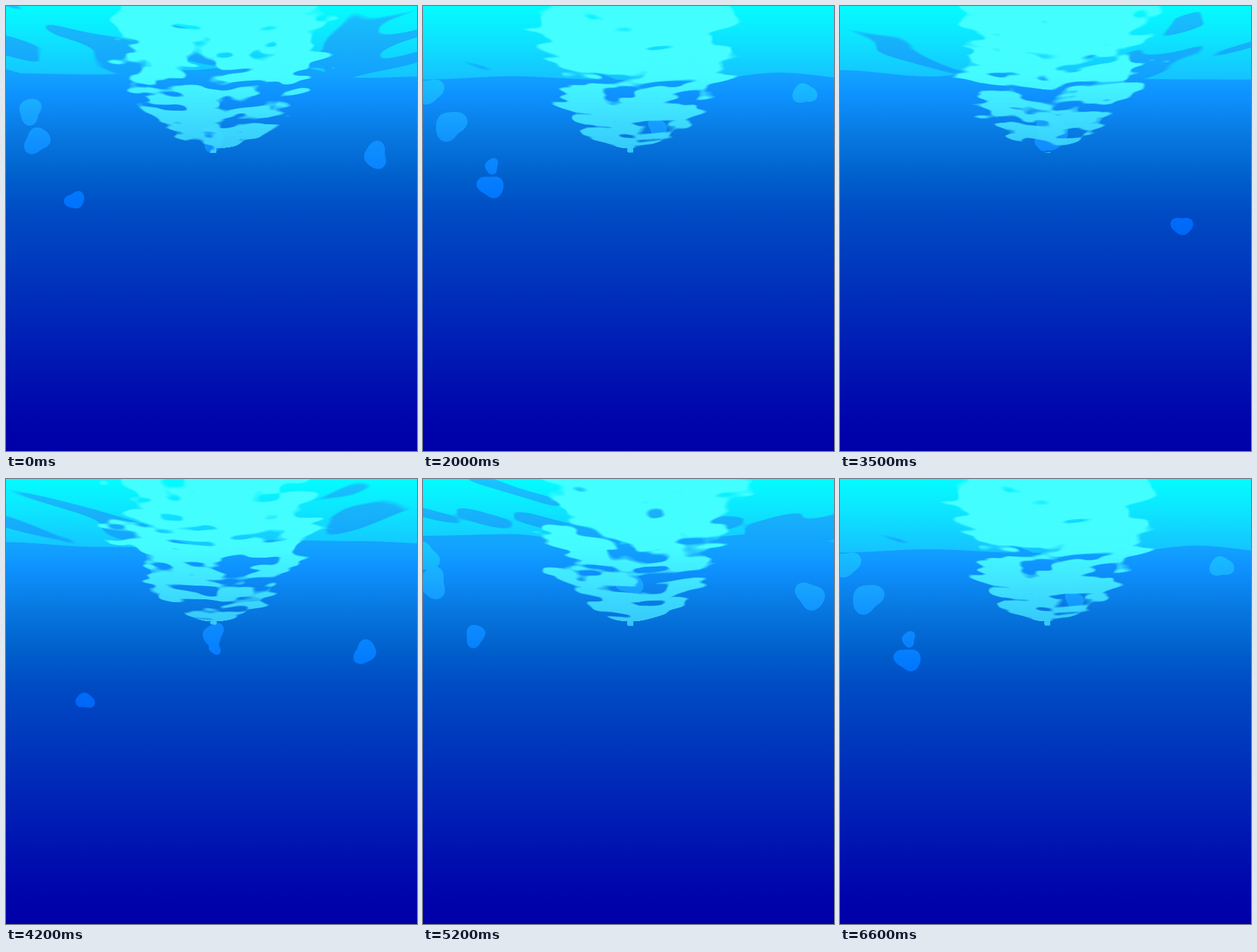
An HTML page with a canvas for the animation above (6.7 s loop, 600x651 px).

```html
<!DOCTYPE html>
<html lang="en">
<head>
<meta charset="utf-8">
<title>Under the surface</title>
<style>
html, body { margin: 0; width: 100%; height: 100%; overflow: hidden; background: #0000a8; }
canvas { display: block; width: 600px; height: 651px; }
</style>
</head>
<body>
<canvas id="sea" width="600" height="651"></canvas>
<script>
const STEP = 100, STEPS = 67, CYCLE = 46;
const W = 600, H = 651, TOP = 215, MID = 315;

// Each bubble: step of birth, place and radius at birth, steps it lives
const bubbles = [
  [7, 209, 145, 16, 7], [8, 337, 281, 11, 14], [9, 138, 378, 14, 19], [14, 532, 170, 14, 15],
  [16, 59, 206, 20, 13], [18, 108, 252, 10, 6], [22, 61, 176, 24, 8], [22, 310, 297, 19, 13],
  [22, 301, 320, 9, 13], [25, 82, 246, 6, 8], [34, 496, 332, 14, 23], [40, 303, 245, 15, 17],
  [41, 305, 256, 9, 3], [41, 119, 335, 12, 26], [45, 50, 205, 18, 11], [48, 25, 140, 18, 8]
];

const ctx = document.getElementById("sea").getContext("2d");
const layer = document.createElement("canvas").getContext("2d");
layer.canvas.width = W;
layer.canvas.height = TOP;
const pixels = layer.createImageData(W, TOP);
pixels.data.fill(255);

function gradient(stops, height) {
  const g = ctx.createLinearGradient(0, 0, 0, height);
  for (const [y, color] of stops) g.addColorStop(y / height, color);
  return g;
}

const deep = gradient([[0, "#18c4ff"], [55, "#17b0fa"], [100, "#12a2ff"], [130, "#0e92ff"], [190, "#0878e0"],
  [250, "#0060cc"], [300, "#004cc4"], [400, "#0034bc"], [500, "#001cb4"], [600, "#0005ac"], [651, "#0000a8"]], H);
const lit = gradient([[0, "#04fcff"], [55, "#0ee0ff"], [100, "#14c6ff"], [145, "#19aaff"],
  [200, "#1090ff"], [280, "#0076ff"], [380, "#0058f0"], [651, "#0030d0"]], H);
const shine = gradient([[0, "#42ffff"], [100, "#44fcff"], [150, "rgba(68,234,255,.94)"], [215, "rgba(62,214,255,.85)"]], TOP);

// Seeded lattice for smooth noise that repeats after a number of cells in time
const lattice = new Float32Array(4096);
let seed = 7;
for (let i = 0; i < lattice.length; i++) {
  seed = (Math.imul(seed, 1664525) + 1013904223) >>> 0;
  lattice[i] = seed / 2 ** 32;
}

const mix = (a, b, w) => a + (b - a) * w;
const ease = w => w * w * (3 - 2 * w);

function noise(x, y, t, cells) {
  const i = Math.floor(x), j = Math.floor(y), k = Math.floor(t);
  const u = ease(x - i), v = ease(y - j), w = ease(t - k);
  const at = (a, b, c) => lattice[(a * 73 + b * 1259 + c * 2711) & 4095];
  const plane = c => mix(mix(at(i, j, c), at(i + 1, j, c), u), mix(at(i, j + 1, c), at(i + 1, j + 1, c), u), v);
  return mix(plane(k % cells), plane((k + 1) % cells), w);
}

// Rippled surface: light above its edge, cut by slanted dark streaks
function surface(phase) {
  const cells = 8, t = phase / CYCLE * cells;
  const rough = 0.5 + 0.5 * Math.cos(2 * Math.PI * (phase - 2) / CYCLE);
  const edge = Array.from({ length: W }, (_, x) => 98 - 8 * rough + 30 * (noise(x / 130, 3, t, cells) - 0.5));
  return (x, y) => {
    const below = (edge[x] - y) * 0.05;
    if (below < -0.1) return -1;
    const slant = y + 0.28 * Math.abs(x - MID);
    const limit = (0.14 + 0.28 * rough) * Math.min(1, (y + 25) / 70);
    return Math.min(below, noise(x / 85, slant / 17, t, cells) - limit);
  };
}

// Glitter: dense core that breaks into thin slivers towards its rim and its foot
function glitter(phase) {
  const cells = 10, t = phase / CYCLE * cells;
  return (x, y) => {
    const half = 150 * Math.sqrt(Math.max(0.001, 1 - (y / 208) ** 2));
    const inside = 1 - Math.abs(x - MID + y * 0.06) / half;
    const core = mix(0.24, 0.07, Math.min(1, Math.max(0, (y - 40) / 75)));
    const bias = Math.min(core, 1.1 * inside - 0.12);
    if (bias < -0.5) return -1;
    const u = x / 48, v = 18 * ((y + 0.1 * Math.abs(x - MID)) / 200) ** 1.3;
    return bias + 0.65 * noise(u, v, t, cells) + 0.35 * noise(u * 2.1 + 9, v * 1.7, t, cells) - 0.5;
  };
}

function drawField(field, gain, paint) {
  for (let y = 0, k = 3; y < TOP; y++)
    for (let x = 0; x < W; x++, k += 4)
      pixels.data[k] = 255 * (field(x, y) * gain + 0.5);
  layer.putImageData(pixels, 0, 0);
  layer.globalCompositeOperation = "source-in";
  layer.fillStyle = paint;
  layer.fillRect(0, 0, W, TOP);
  ctx.drawImage(layer.canvas, 0, 0);
}

// Bubbles rise ever slower, spread from the middle, grow and wobble
function drawBubble([, x0, y0, r0], age, id) {
  const x = MID + (x0 - MID) * Math.exp(0.018 * age);
  const y = (y0 + 200) * Math.exp(-0.02 * age) - 200;
  const r = r0 * Math.exp(0.02 * age);
  ctx.beginPath();
  for (let a = 0; a < 2 * Math.PI; a += 0.1) {
    const d = r * (1 + 0.14 * Math.sin(2 * a + id * 2 + age * 0.3) + 0.1 * Math.sin(3 * a + id - age * 0.4));
    ctx.lineTo(x + d * Math.cos(a), y + d * Math.sin(a));
  }
  ctx.fill();
}

function draw(step) {
  const phase = step % CYCLE;
  ctx.fillStyle = deep;
  ctx.fillRect(0, 0, W, H);
  drawField(surface(phase), 20, lit);
  ctx.fillStyle = lit;
  bubbles.forEach((bubble, id) => {
    const age = (phase - bubble[0] + CYCLE) % CYCLE;
    if (age <= bubble[4]) drawBubble(bubble, age, id);
  });
  drawField(glitter(phase), 12, shine);
}

const start = performance.now();
let shown = -1;
function tick() {
  const step = Math.floor((performance.now() - start) / STEP) % STEPS;
  if (step !== shown) draw(shown = step);
  requestAnimationFrame(tick);
}
tick();
</script>
</body>
</html>
```
